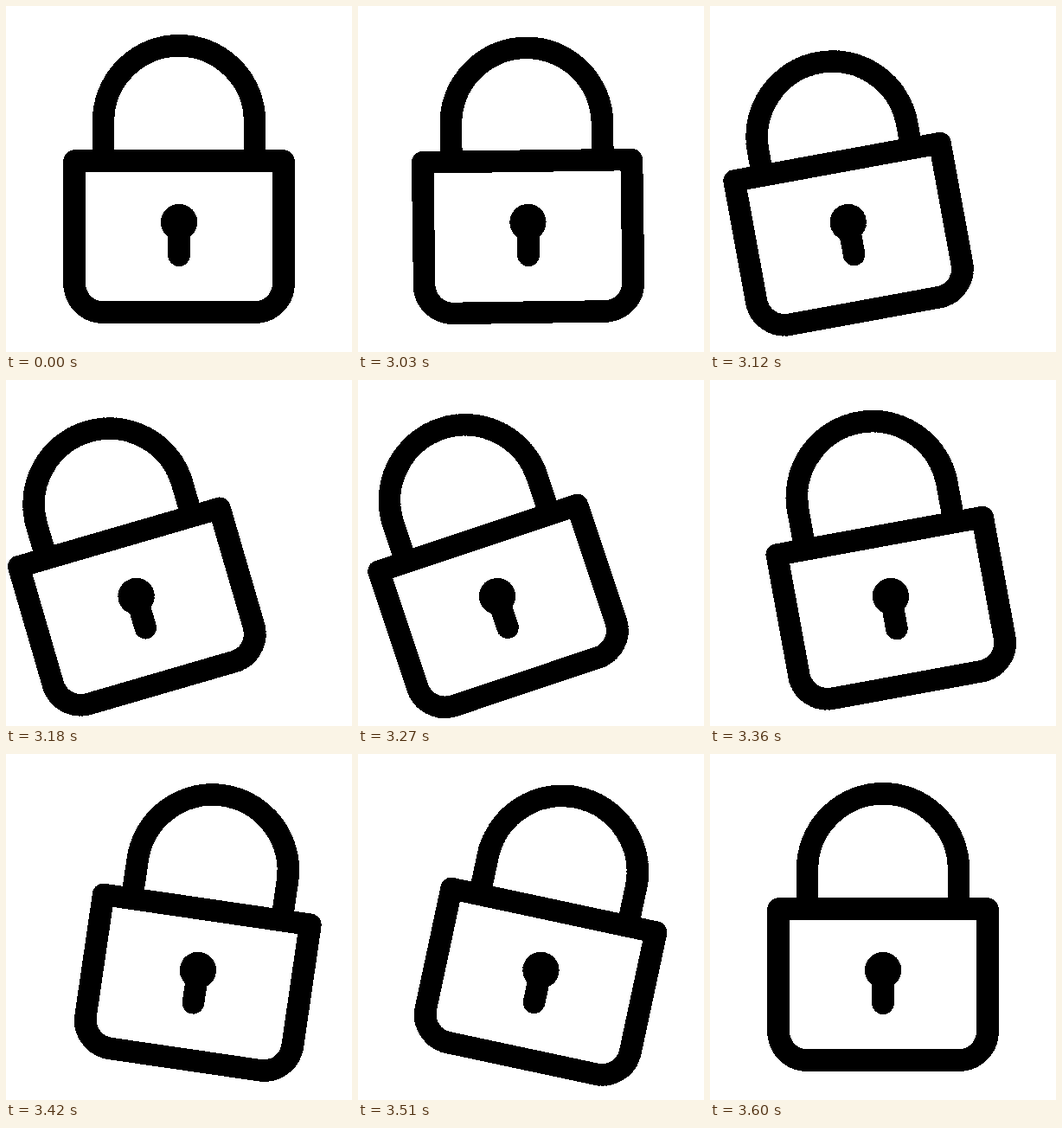
Animation of 400x400 px, one loop 3630 ms. Source, as an HTML page without scripts:

```html
<!DOCTYPE html>
<html lang="en">
<head>
<meta charset="utf-8">
<title>Padlock shake</title>
<style>
html, body {
  margin: 0;
  width: 100%;
  height: 100%;
  overflow: hidden;
  background: #fff;
}
svg {
  display: block;
  width: 100vw;
  height: 100vh;
}
.lock {
  fill: none;
  stroke: #000;
  stroke-width: 1.5;
  stroke-linejoin: round;
}
.hole { fill: #000; stroke: none; }
.slide, .tilt, .shackle { animation: 3630ms linear infinite; }
.slide { animation-name: slide; }
.tilt { animation-name: tilt; transform-origin: 12px 15px; }
.shackle { animation-name: press; }

/* rest for 3 s, then shake for 0.6 s */
@keyframes slide {
  0% { transform: translateX(0); }
  82.645% { transform: translateX(0); animation-timing-function: cubic-bezier(.36, 0, .37, 1); }
  88.264% { transform: translateX(-3px); animation-timing-function: cubic-bezier(.5, 0, .556, 1); }
  94.38% { transform: translateX(1.32px); animation-timing-function: ease-in-out; }
  99.174%, 100% { transform: translateX(0); }
}
@keyframes tilt {
  0% { transform: rotate(0deg); }
  82.645% { transform: rotate(0deg); animation-timing-function: cubic-bezier(.342, 0, .5, 1); }
  89.669% { transform: rotate(-18.6deg); animation-timing-function: cubic-bezier(.72, 0, .535, 1); }
  95.868% { transform: rotate(14deg); animation-timing-function: ease-in-out; }
  99.174%, 100% { transform: rotate(0deg); }
}
@keyframes press {
  0% { transform: translateY(0); }
  82.645% { transform: translateY(0); animation-timing-function: ease-in-out; }
  85.785% { transform: translateY(1px); animation-timing-function: ease-in-out; }
  88.926%, 100% { transform: translateY(0); }
}
</style>
</head>
<body>
<svg viewBox="0 0 24 24">
  <!-- hard pixel edges -->
  <filter id="crisp" filterUnits="userSpaceOnUse" x="0" y="0" width="24" height="24">
    <feComponentTransfer>
      <feFuncA type="discrete" tableValues="0 1 1 1"/>
    </feComponentTransfer>
  </filter>
  <g filter="url(#crisp)">
    <g class="slide">
      <g class="tilt lock">
        <path class="shackle" d="M6.75 10.3V8a5.25 5.25 0 0 1 10.5 0v2.3"/>
        <path d="M4.75 10.75h14.5v8.5a2 2 0 0 1-2 2H6.75a2 2 0 0 1-2-2z"/>
        <circle class="hole" cx="12" cy="15" r="1.25"/>
        <path d="M12 15v2.28" stroke-linecap="round"/>
      </g>
    </g>
  </g>
</svg>
</body>
</html>
```
